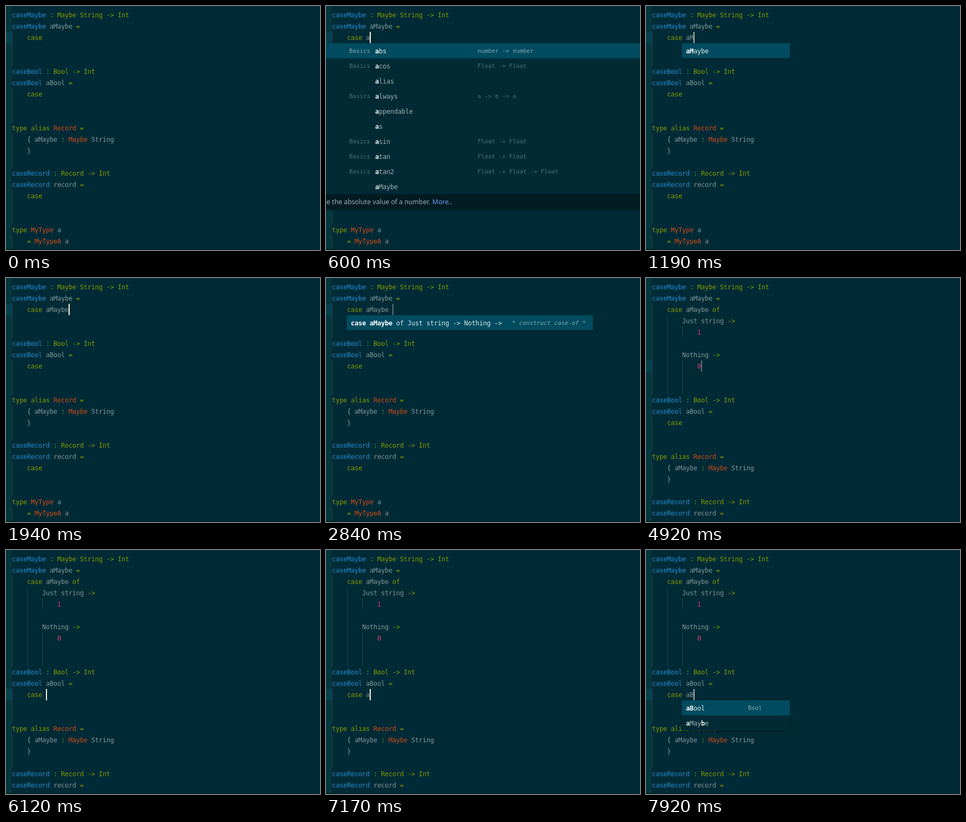
Write an HTML page that moves like this. It is 582 px wide and 453 px high and loops after 8 s.

```html
<!DOCTYPE html>
<html lang="en">
<head>
<meta charset="utf-8">
<title>Editor completion</title>
<style>
  html, body { margin: 0; width: 100%; height: 100%; overflow: hidden; background: #002b36; }
  svg { display: block; width: 582px; height: 453px; }
  text { font: 12px "DejaVu Sans Mono", monospace; fill: #839496; }
  .b { fill: #268bd2; }
  .g { fill: #859900; }
  .o { fill: #cb4b16; }
  .m { fill: #d33682; }
  .item { fill: #9fb0b2; }
  .bold { font-weight: bold; fill: #e3ecec; }
  .pick { fill: #dce8ea; }
  .pick.bold { fill: #fff; }
  .side { font-size: 10.8px; fill: #4f727b; }
  .side.pick { fill: #86a9b1; }
  .note { font-style: italic; }
  .doc { font: 12.3px "Noto Sans", "Open Sans", sans-serif; fill: #9fb0b2; }
  .link { fill: #6c9cf0; }
  .popup { filter: drop-shadow(0 1px 2px rgba(0, 0, 0, .4)); }
</style>
</head>
<body>
<svg id="stage" viewBox="0 0 582 453"></svg>
<script>
const stage = document.getElementById('stage');
const LOOP = 8000, LEFT = 11, TOP = 6, CH = 7, LINE = 21, ITEM = 28;

// Each "~" starts a token; the letter after it is its colour class.
const signature = ['~bcaseMaybe~g : Maybe String -> Int', '~bcaseMaybe~t aMaybe~g ='];

const tail = word => [
  '~bcaseBool~g : Bool -> Int',
  '~bcaseBool~t aBool~g =',
  '~g    case~t ' + word,
  '', '',
  '~gtype alias~o Record~g =',
  '~t    { aMaybe~g :~o Maybe~t String',
  '~t    }',
  '',
  '~bcaseRecord~g : Record -> Int',
  '~bcaseRecord~t record~g =',
  '~g    case',
  '', '',
  '~gtype~o MyType~t a',
  '~g    =~o MyTypeA~t a'
];

const before = word => [...signature, '~g    case~t ' + word, '', '', ...tail('')];

const after = (word, one, zero) => [
  ...signature,
  '~g    case~t aMaybe~g of',
  '~t        Just string~g ->',
  '~m            ' + one,
  '',
  '~t        Nothing~g ->',
  '~m            ' + zero,
  '', '',
  ...tail(word)
];

// Indent guides: level, first row, row after the last
const guidesBefore = [[0, 2, 5], [0, 7, 10], [0, 11, 14], [0, 16, 19], [0, 20, 22]];
const guidesAfter = [[0, 2, 10], [1, 3, 10], [2, 4, 5], [2, 7, 10], [0, 12, 15], [0, 16, 19], [0, 21, 22]];

// Items: label with matched letters between stars, module, type
const basics = [
  ['*a*bs', 'Basics', 'number -> number'],
  ['*a*cos', 'Basics', 'Float -> Float'],
  ['*a*lias'],
  ['*a*lways', 'Basics', 'a -> b -> a'],
  ['*a*ppendable'],
  ['*a*s'],
  ['*a*sin', 'Basics', 'Float -> Float'],
  ['*a*tan', 'Basics', 'Float -> Float'],
  ['*a*tan2', 'Basics', 'Float -> Float -> Float'],
  ['*a*Maybe']
];
const wide = y => ({ x: -20, y, w: 640, label: 91, type: 281, items: basics, doc: true });
const small = (y, items) => ({ x: 66, y, w: 201, label: 74, type: 189, items });
const popups = {
  below: wide(69),
  above: wide(-50),
  maybe: small(69, [['*aM*aybe']]),
  bool: small(279, [['*aB*ool', '', 'Bool'], ['*a*May*b*e']]),
  build: {
    x: 38, y: 69, w: 457, label: 46, type: 345, note: true,
    items: [['*case aMaybe* of Just string -> Nothing ->', '', '* construct case-of *']]
  }
};

// Keystrokes: time, caret row, caret column, typed word, popup
const keys = [
  [-750, 2, 9, ''],
  [450, 2, 10, 'a'],
  [600, 2, 10, 'a', 'below'],
  [740, 2, 11, 'aM', 'maybe'],
  [1940, 2, 15, 'aMaybe'],
  [2240, 2, 16, 'aMaybe', 'build'],
  [2970, 4, 12, ''],
  [3870, 4, 13, ''],
  [4020, 7, 12, ''],
  [4320, 7, 13, ''],
  [5220, 8, 0, ''],
  [5370, 9, 0, ''],
  [5520, 10, 13, ''],
  [5670, 11, 13, ''],
  [6120, 12, 9, ''],
  [7170, 12, 10, 'a'],
  [7320, 12, 10, 'a', 'above'],
  [7470, 12, 11, 'aB', 'bool']
];
const EXPAND = 2970, ONE = 3870, ZERO = 4320;

const escape = s => s.replace(/&/g, '&amp;').replace(/</g, '&lt;').replace(/>/g, '&gt;');
const rect = (x, y, w, h, fill, extra = '') =>
  `<rect x="${x}" y="${y}" width="${w}" height="${h}" fill="${fill}" ${extra}/>`;

// Monospaced text on a fixed character grid
function mono(str, x, y, cls, step = CH) {
  let out = '';
  for (const m of str.matchAll(/\S+/g)) {
    const xs = [...m[0]].map((_, i) => x + (m.index + i) * step).join(' ');
    out += `<text class="${cls}" x="${xs}" y="${y}">${escape(m[0])}</text>`;
  }
  return out;
}

function codeLine(src, row) {
  let x = LEFT, out = '';
  for (const token of src.split('~').slice(1)) {
    const str = token.slice(1);
    out += mono(str, x, TOP + row * LINE + 15, token[0]);
    x += str.length * CH;
  }
  return out;
}

function popup(p) {
  const h = p.items.length * ITEM;
  let out = rect(p.x, p.y, p.w, h + (p.doc ? ITEM : 0), '#012a35', 'rx="2"');
  p.items.forEach(([label, module = '', type = ''], i) => {
    const y = p.y + i * ITEM, base = y + 19, pick = i ? '' : ' pick';
    if (!i) out += rect(p.x, y, p.w, ITEM, '#004b5f', 'rx="2"');
    let x = p.label;
    label.split('*').forEach((part, k) => {
      out += mono(part, x, base, 'item' + (k % 2 ? ' bold' : '') + pick);
      x += part.length * CH;
    });
    out += mono(module, 43, base - 1, 'side' + pick, 6.5);
    out += mono(type, p.type, base - 1, 'side' + pick + (p.note ? ' note' : ''), 6.5);
  });
  if (p.doc) {
    const y = p.y + h;
    out += rect(p.x, y, p.w, ITEM, '#001b22');
    out += `<text class="doc" x="193" y="${y + 19}" text-anchor="end">Take the absolute value of a number.</text>`;
    out += `<text class="doc link" x="197" y="${y + 19}">More..</text>`;
  }
  return `<g class="popup">${out}</g>`;
}

// The caret stays lit after a key, then fades out and in by steps.
function caretLevel(idle) {
  if (idle < 450) return 1;
  return [.65, .35, 0, .35, .65][Math.floor((idle - 450) / 150)] ?? 1;
}

function draw(t) {
  const [time, row, col, word, pop] = keys.findLast(k => k[0] <= t);
  const open = t >= EXPAND;
  const lines = open ? after(word, t >= ONE ? '1' : '', t >= ZERO ? '0' : '') : before(word);
  const y = TOP + row * LINE;

  let out = rect(0, 0, 582, 453, '#002b36');
  out += rect(0, 0, LEFT, 453, '#043640') + rect(0, y, LEFT, LINE, '#07424f');
  for (const [level, from, to] of open ? guidesAfter : guidesBefore)
    out += rect(LEFT + level * 28, TOP + from * LINE, 1, (to - from) * LINE, '#1c444d');
  out += lines.map(codeLine).join('');
  out += rect(LEFT + col * CH, y, 2, LINE, '#fdf6e3', `opacity="${caretLevel(t - time)}"`);
  out += rect(0, 451, 582, 2, '#00202a');
  if (pop) out += popup(popups[pop]);
  return out;
}

let shown = '';
function tick() {
  const next = draw(performance.now() % LOOP);
  if (next !== shown) stage.innerHTML = shown = next;
  requestAnimationFrame(tick);
}
tick();
</script>
</body>
</html>
```
